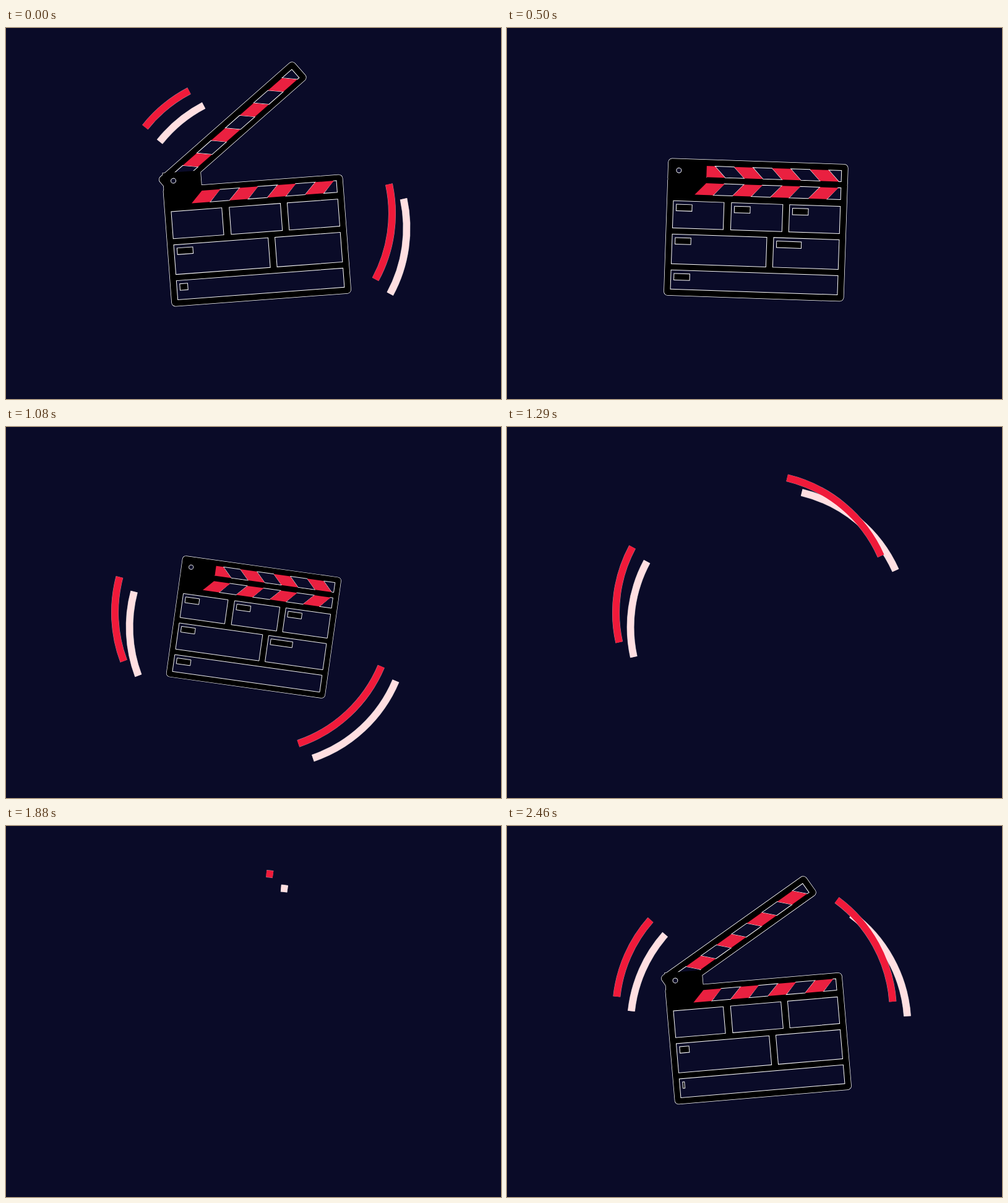
Recreate the animation shown at these times as an HTML page. Size 800x600 px, loop 2.5 s.

```html
<!DOCTYPE html>
<html lang="en">
<head>
<meta charset="utf-8">
<title>Clapperboard</title>
<style>
  html, body { margin: 0; width: 100%; height: 100%; overflow: hidden; background: #0a0b28; }
  svg { display: block; width: 100vw; height: 100vh; }
  .edge { stroke: #fff; fill: none; stroke-linejoin: round; }
  .hole { fill: #0a0b28; stroke: #fff; stroke-width: 1; }
  .tag { fill: #000; stroke: #fff; stroke-width: 1; }
  .red { fill: #ea2040; }
  .arc path { fill: none; }
  .arc .rim { stroke: #fff; stroke-width: 12; opacity: .6; }
  .arc .ink { stroke-width: 11.2; }
</style>
</head>
<body>
<svg id="stage" viewBox="0 0 800 600" xmlns="http://www.w3.org/2000/svg">
  <rect width="800" height="600" fill="#0a0b28"/>
  <g id="board">
    <g id="rims"></g>
    <g id="arm"></g>
    <g id="body"></g>
  </g>
  <g id="pink" class="arc" transform="translate(423.6 323.6)"></g>
  <g id="red" class="arc" transform="translate(400 300)"></g>
</svg>
<script>
const LOOP = 2500, FPS = 24, R = 224;
const HINGE = [17.3, 18.6];
const $ = id => document.getElementById(id);

function add(parent, name, attrs) {
  const el = document.createElementNS('http://www.w3.org/2000/svg', name);
  for (const k in attrs) el.setAttribute(k, attrs[k]);
  parent.appendChild(el);
  return el;
}

// Keys are [time, value, power]; a positive power eases in, a negative one eases out.
function track(keys, t) {
  if (t <= keys[0][0]) return keys[0][1];
  for (let i = 1; i < keys.length; i++) {
    const [t1, v1, pow = 1] = keys[i], [t0, v0] = keys[i - 1];
    if (t <= t1) {
      let u = (t - t0) / (t1 - t0);
      u = pow > 0 ? u ** pow : 1 - (1 - u) ** -pow;
      return v0 + (v1 - v0) * u;
    }
  }
  return keys[keys.length - 1][1];
}

const smooth = p => p * p * (3 - 2 * p);

// ---- clapperboard, 290 x 221 units ----
const board = $('board'), arm = $('arm'), body = $('body'), rims = $('rims');
const armBox = { x: 0, y: 0, width: 290, height: 37, rx: 6 };
const plate = { x: 1, y: 5, width: 61, height: 40 };
const base = { x: 0, y: 29, width: 290, height: 192, rx: 6 };

const armRim = add(rims, 'rect', { ...armBox, class: 'edge' });
add(rims, 'rect', { ...plate, class: 'edge' });
add(rims, 'rect', { ...base, class: 'edge' });
add(arm, 'rect', armBox);
add(body, 'rect', plate);
add(body, 'rect', base);

// One slanted piece of a strip, cut off at the strip's right end.
function slant(parent, cls, y0, y1, top, bottom, step) {
  const x = v => Math.min(280, v + step * 61.3);
  add(parent, 'polygon', {
    class: cls,
    points: `${x(top[0])},${y0} ${x(top[1])},${y0} ${x(bottom[1])},${y1} ${x(bottom[0])},${y1}`
  });
}
for (let k = 0; k < 5; k++) slant(arm, 'hole', 10, 28, [14, 45], [31, 62], k);
for (let k = 0; k < 4; k++) {
  slant(arm, 'red', 10, 28, [45, 75], [62, 92], k);
  slant(body, 'hole', 38, 57, [91, 123.3], [74, 105.3], k);
  slant(body, 'red', 38, 57, [62, 92], [44, 74], k);
}
add(body, 'circle', { class: 'hole', cx: HINGE[0], cy: HINGE[1], r: 4 });

// x, y, width, height, label width, label start, label time
const cells = [
  [10, 122, 153, 48, 25.5, 2428, 50],
  [10, 180, 270, 31, 25.5, 2445, 110],
  [174, 122, 106, 48, 40, 2540, 90],
  [10, 68, 82, 44, 25.5, 2580, 90],
  [104, 68, 83, 44, 25.5, 2620, 90],
  [198, 68, 82, 44, 25.5, 2660, 90]
];
const tags = cells.map(([x, y, width, height, w, start, time]) => {
  add(body, 'rect', { class: 'hole', x, y, width, height });
  const el = add(body, 'rect', { class: 'tag', x: x + 5, y: y + 5.5, height: 10.5 });
  return { el, w, start, time };
});

const tilt = [[1930, -20], [2167, -9.7, -1.2], [2458, -4.9, -1.2], [2500, -4.3],
  [3000, 1.95], [3375, 5.85], [3730, 9.5]];
const size = [[1930, 0], [2110, 1.12, -1.5], [2167, 1.095], [2400, .98, -1.6],
  [2458, .985], [2500, 1], [3480, 1], [3730, 0, 2.5]];
const swing = [[2210, 0], [2458, 30.5, 1.4], [2500, 37.1], [2640, 44.5, -2.5],
  [2680, 44.5], [2860, 0, 2]];
const slip = [[2167, 1], [2300, 0, -2]];
const glow = [[2110, 4], [2167, 3.4], [2300, 1.5]];

function drawBoard(time) {
  const t = time < 1700 ? time + LOOP : time;
  const s = track(size, t);
  board.style.display = s > .005 ? '' : 'none';
  board.setAttribute('transform',
    `rotate(${track(tilt, t)} 429 306) translate(403.1 327.3) scale(${s}) translate(-145 -110.5)`);
  const k = track(slip, t);
  const pose = `translate(${8 * k} ${9.5 * k}) rotate(${-track(swing, t)} ${HINGE})`;
  arm.setAttribute('transform', pose);
  armRim.setAttribute('transform', pose);
  rims.setAttribute('stroke-width', track(glow, t));
  for (const { el, w, start, time: len } of tags) {
    const u = Math.max(0, Math.min(1, (t - start) / len));
    el.setAttribute('width', w * u);
    el.style.display = u > 0 ? '' : 'none';
  }
}

// ---- sweeping arcs: start angle, progress keys ----
const sweeps = [
  [-90, [[727, 0], [875, .1935], [1292, .737], [1494, 1]]],
  [90, [[806, 0], [875, .0893], [1292, .625], [1583, 1]]],
  [-90, [[1800, 0], [1875, .0893], [2167, .405], [2458, .769], [2500, .83], [2626, 1]]],
  [90, [[1963, 0], [2167, .273], [2458, .6645], [2500, .737], [2695, 1]]]
].map(([from, keys]) => {
  const paths = [];
  for (const [id, color] of [['pink', '#ffdfe1'], ['red', '#f01a3a']]) {
    paths.push(add($(id), 'path', { class: 'rim' }));
    paths.push(add($(id), 'path', { class: 'ink', stroke: color }));
  }
  return { from, keys, paths };
});

function point(deg) {
  const a = deg * Math.PI / 180;
  return `${(R * Math.cos(a)).toFixed(2)} ${(R * Math.sin(a)).toFixed(2)}`;
}

function drawArcs(time) {
  const t = time < 600 ? time + LOOP : time;
  for (const { from, keys, paths } of sweeps) {
    const p = track(keys, t);
    const lag = p * (1 - p) * (.17 + .5 * p - .15 * p * p);
    const head = from + 360 * smooth(p), tail = from + 360 * smooth(p - lag);
    const d = p > 0 && p < 1 ? `M${point(tail)}A${R} ${R} 0 0 1 ${point(head)}` : '';
    for (const el of paths) el.setAttribute('d', d);
  }
}

function render(ms) {
  const t = Math.floor((ms % LOOP) * FPS / 1000 + .1) % 60 * 1000 / FPS;
  drawBoard(t);
  drawArcs(t);
}

const begin = performance.now();
function tick() {
  render(performance.now() - begin);
  requestAnimationFrame(tick);
}
tick();
</script>
</body>
</html>
```
